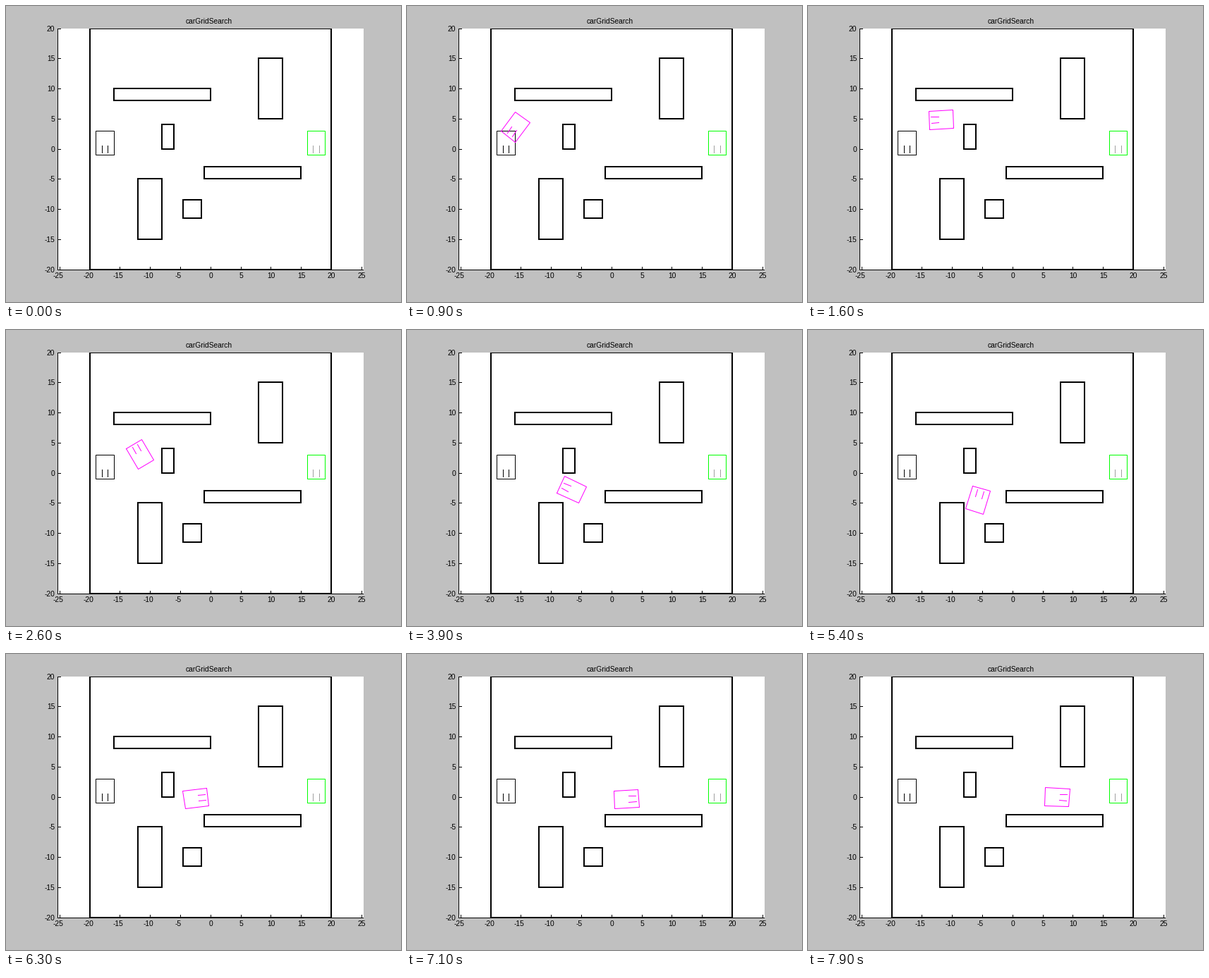
A matplotlib script for the animation above (8000 ms loop, 560 px wide and 420 px high).

```python
import numpy as np
import matplotlib.pyplot as plt
from matplotlib.animation import FuncAnimation
from matplotlib.patches import FancyBboxPatch, Rectangle

W, H, DPI = 560, 420, 100
PX = 72 / DPI                                 # one pixel in points
SCALE, ORIGIN = 8.5575, np.array([289.8, 202.66])  # pixels per unit, world origin
FONT = dict(family="Liberation Sans", size=10.3 * PX, va="baseline")

STEP, TURN = 0.616, np.radians(7.3)           # travel and turn per step
START, GOAL = (-17.5, 0), (17.5, 0)
L, S, R = 1, 0, -1

# Manoeuvres: number of steps (negative in reverse) and steering
DRIVE = [(14.35, R), (-3.95, L), (2.25, R), (9.57, S), (6.38, L), (-1.9, L),
         (5.6, R), (-1.5, L), (-0.35, S), (0.35, S), (1.6, R), (-12.8, L),
         (-4.9, S), (-1, R), (-7.7, S), (-0.8, L)]

OBSTACLES = [(-20, -20, 40, 40), (-16, 8, 16, 2), (8, 5, 4, 10), (-8, 0, 2, 4),
             (-1, -5, 16, 2), (-12, -15, 4, 10), (-4.5, -11.5, 3, 3)]

BODY = np.array([(-1, -1.5), (3, -1.5), (3, 1.5), (-1, 1.5), (-1, -1.5)])
WHEELS = [np.array([(-0.6, s), (0.6, s)]) for s in (-0.5, 0.5)]


def to_px(pts):
    return np.round(ORIGIN + np.asarray(pts) * (SCALE, -SCALE))


def pose(steps):
    """Rear axle and heading after a number of steps along the drive."""
    pos, head = np.array(START, float), np.pi / 2
    for run, steer in DRIVE:
        n = np.sign(run) * min(abs(run), steps)
        turn = n * steer * TURN
        mid = head + turn / 2
        chord = n * STEP * np.sinc(turn / (2 * np.pi))
        pos += chord * np.array([np.cos(mid), np.sin(mid)])
        head += turn
        steps -= abs(n)
    return pos, head


fig = plt.figure(figsize=(W / DPI, H / DPI), dpi=DPI, facecolor="#c0c0c0")
ax = fig.add_axes([0, 0, 1, 1])
ax.set_xlim(0, W)
ax.set_ylim(H, 0)
ax.axis("off")
paper = ax.add_patch(Rectangle((73, 32), 434, 343, fc="white", ec="none", zorder=0))


def line(xs, ys, color="black", width=1, z=2):
    """Line through pixel centres."""
    return ax.plot(np.add(xs, 0.5), np.add(ys, 0.5), color=color, lw=width * PX,
                   snap=False, solid_capstyle="projecting",
                   solid_joinstyle="miter", zorder=z)[0]


def make_car(color, wheel_color):
    return [line([], [], c, z=4) for c in (color, wheel_color, wheel_color)]


def set_car(parts, pos, head):
    c, s = np.cos(head), np.sin(head)
    for part, shape in zip(parts, [BODY] + WHEELS):
        part.set_data(*(to_px(shape @ [(c, s), (-s, c)] + pos) + 0.5).T)


# Axes
line([73, 73], [32, 374])
line([73, 506], [374, 374])
for v in range(-25, 26, 5):
    x, y = to_px((v, v))
    line([x, x], [370, 374])
    ax.text(x - 3 * (v < 0) + 0.5, 386, str(v), ha="center", **FONT)
    if abs(v) <= 20:
        line([73, 77], [y, y])
        ax.text(69.5, y + 4, str(v), ha="right", **FONT)
ax.text(288, 25, "carGridSearch", ha="center", **FONT)

for x, y, w, h in OBSTACLES:
    corner, far = to_px((x, y)), to_px((x + w, y + h))
    box = ax.add_patch(Rectangle(corner, *(far - corner), fill=False, ec="black",
                                 lw=2 * PX, snap=False, joinstyle="miter", zorder=3))
    box.set_clip_path(paper)

set_car(make_car("black", "black"), START, np.pi / 2)
set_car(make_car("#00ff00", "#a0a0a0"), GOAL, np.pi / 2)
car = make_car("#ff00ff", "#ff00ff")

# Translucent panel that pops up at the bottom
panel = [ax.add_patch(FancyBboxPatch((181, 357), 200, 120, fc="#dbdbdb", ec="none",
                                     alpha=0.71, zorder=6,
                                     boxstyle="round,pad=0,rounding_size=15")),
         line([315, 325], [410, 422], "#606060", 4, 7),
         line([290, 296], [420, 414], "#606060", 3, 7),
         line([263, 268], [421, 417], "#606060", 2.5, 7)]


def update(i):
    step = max(0, i - 4)
    set_car(car, *pose(step))
    for part in car:
        part.set_visible(step > 0)
    for part in panel:
        part.set_visible(4700 <= i * 100 < 4900)
    return car + panel


anim = FuncAnimation(fig, update, frames=80, interval=100, init_func=lambda: update(0),
                     repeat=True, repeat_delay=0, blit=False)
plt.show()
```
